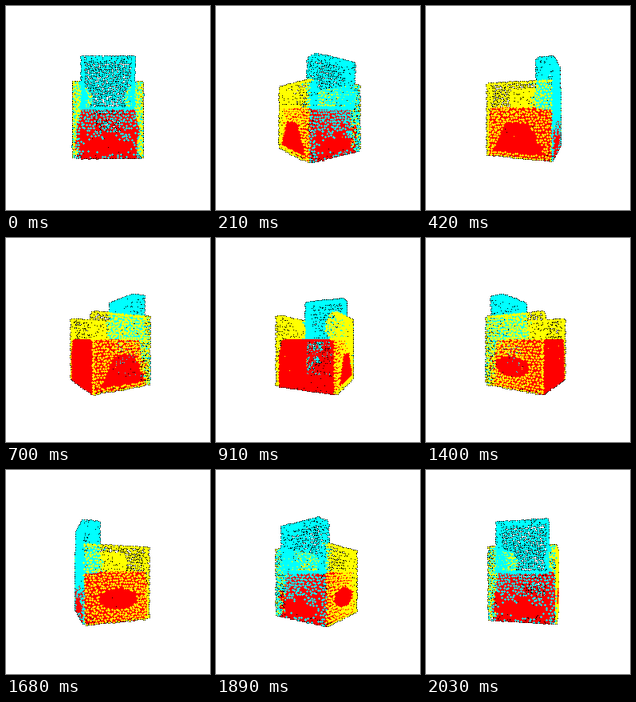
Write a matplotlib script that moves like this. It is 256 px wide and 256 px high and loops after 2100 ms.

```python
import numpy as np
import matplotlib.pyplot as plt
from matplotlib.animation import FuncAnimation

SIZE, FRAMES, STEP = 256, 30, 70
CAMERA = 200                      # distance from the axis of rotation
W, TOP, ARM, BASE = 36, 53.3, 27, -52.5
BACK_W, BACK_Z = 27.2, 18
CYAN, YELLOW, RED = range(3)
PALETTE = np.array([[0, 1, 1], [1, 1, 0], [1, 0, 0]])

rng = np.random.default_rng(7)
points, labels = [], []


def grid(u0, u1, v0, v1, density):
    """Evenly scattered samples of a rectangle."""
    gap = density ** -0.5
    nu = max(2, round((u1 - u0) / gap))
    nv = max(2, round((v1 - v0) / gap))
    u, v = np.meshgrid(np.arange(nu) + 0.5, np.arange(nv) + 0.5)
    u = u + 0.25 * (np.arange(nv)[:, None] % 2 * 2 - 1)
    u = u + rng.uniform(-0.3, 0.3, u.shape)
    v = v + rng.uniform(-0.3, 0.3, v.shape)
    return (u0 + (u1 - u0) * u / nu).ravel(), (v0 + (v1 - v0) * v / nv).ravel()


def add(x, y, z, color, red=False):
    x, y, z = np.broadcast_arrays(x, y, z)
    points.append(np.column_stack([x, y, z]).astype(float))
    labels.append(np.where(red, RED, np.full(x.size, color)))


def roll(y):
    """Inner edge of the rounded armrest."""
    return 24 + 8 * ((y - 13) / 14) ** 2


def build_back():
    x, y = grid(-W, W, BASE, ARM, 0.11)
    chance = np.clip((-y - 14) / 30, 0, 0.6) * (np.abs(x) < 30)
    low = (x / 26) ** 2 + ((y + 39) / 7) ** 2 < 1
    add(x, y, W, CYAN, low | (rng.random(x.size) < chance))
    x, y = grid(-BACK_W, BACK_W, ARM, TOP, 0.11)
    add(x, y, W, CYAN)
    x, y = grid(-BACK_W, BACK_W, 0, TOP, 0.1)
    add(x, y, BACK_Z, CYAN)
    for side in (-1, 1):
        z, y = grid(BACK_Z, W, 0, TOP, 0.14)
        add(side * BACK_W, y, z, CYAN)
    x, z = grid(-BACK_W, BACK_W, BACK_Z, W, 0.11)
    add(x, TOP, z, CYAN)
    x, z = grid(-BACK_W, BACK_W, BACK_Z, W, 0.2)
    add(x, 0, z, CYAN)


def build_arm(side):
    z, y = grid(-W, W, BASE, ARM, 0.12)
    if side > 0:
        patch = (z / 22) ** 2 + ((y + 28) / 11) ** 2 < 1
    else:
        patch = (y < -16) & (y > -47) & (np.abs(z) < 13 - (y + 16) * 0.5)
    add(side * W, y, z, YELLOW, patch)
    x, z = grid(30, W, -W, W, 0.12)
    add(side * x, ARM, z, YELLOW)
    z, y = grid(-W, W, 0, ARM, 0.06)
    add(side * roll(y), y, z, np.where(z > 12, CYAN, YELLOW))
    t, y = grid(0, 11, 0, ARM, 0.16)
    add(side * (W + (roll(y) - W) * t / 11), y, -W, YELLOW)
    x, y = grid(33, W, BASE, 0, 0.15)
    add(side * x, y, -W, YELLOW)


def build_seat():
    x, y = grid(-32, 32, BASE, 0, 0.32)
    inside = np.abs(x) < np.minimum(32, 27 - y * 0.25)
    thin = (np.abs(x) < 18) & (y < -16) & (y > -36)
    thin |= (np.abs(x) < 22) & (y < -2) & (y > -10)
    keep = inside & (~thin | (rng.random(x.size) < 0.4))
    add(x[keep], y[keep], -W, RED)
    x, z = grid(-28, 28, -W, BACK_Z, 0.2)
    add(x, -0.5, z, RED)
    x, z = grid(-W + 3, W - 3, -W, W - 3, 0.12)
    add(x, BASE, z, RED)
    for side in (-1, 1):
        z, y = grid(-W, 26, BASE + 1, -0.5, 0.28)
        add(side * np.minimum(31, 28 - y * 0.2), y, z, RED)


build_back()
build_arm(-1)
build_arm(1)
build_seat()
cloud = np.vstack(points)
colors = PALETTE[np.concatenate(labels)]

fig = plt.figure(figsize=(SIZE / 100, SIZE / 100), dpi=100, facecolor="white")
ax = fig.add_axes([0, 0, 1, 1])
ax.set(xlim=(0, SIZE), ylim=(SIZE, 0))
ax.axis("off")


def dots(marker, color, zorder):
    """Crisp marks, three pixels across."""
    return ax.scatter(cloud[:, 0], cloud[:, 1], s=(3 * 0.72) ** 2, c=color,
                      marker=marker, linewidths=0, snap=False, zorder=zorder)


rims = dots("s", np.zeros(colors.shape), 1)
fills = dots("P", colors, 2)


def draw(i):
    a = 2 * np.pi * i / FRAMES
    x, y, z = cloud.T
    depth = z * np.cos(a) - x * np.sin(a)
    scale = 1 / (1 - depth / CAMERA)
    px = SIZE / 2 + (x * np.cos(a) + z * np.sin(a)) * scale
    py = SIZE / 2 - y * scale
    order = np.argsort(depth)
    spots = np.floor(np.column_stack([px, py])[order]) + 0.5
    rims.set_offsets(spots)
    fills.set_offsets(spots)
    fills.set_facecolor(colors[order])
    return rims, fills


anim = FuncAnimation(fig, draw, frames=FRAMES, interval=STEP,
                     repeat=True, repeat_delay=0)
plt.show()
```
